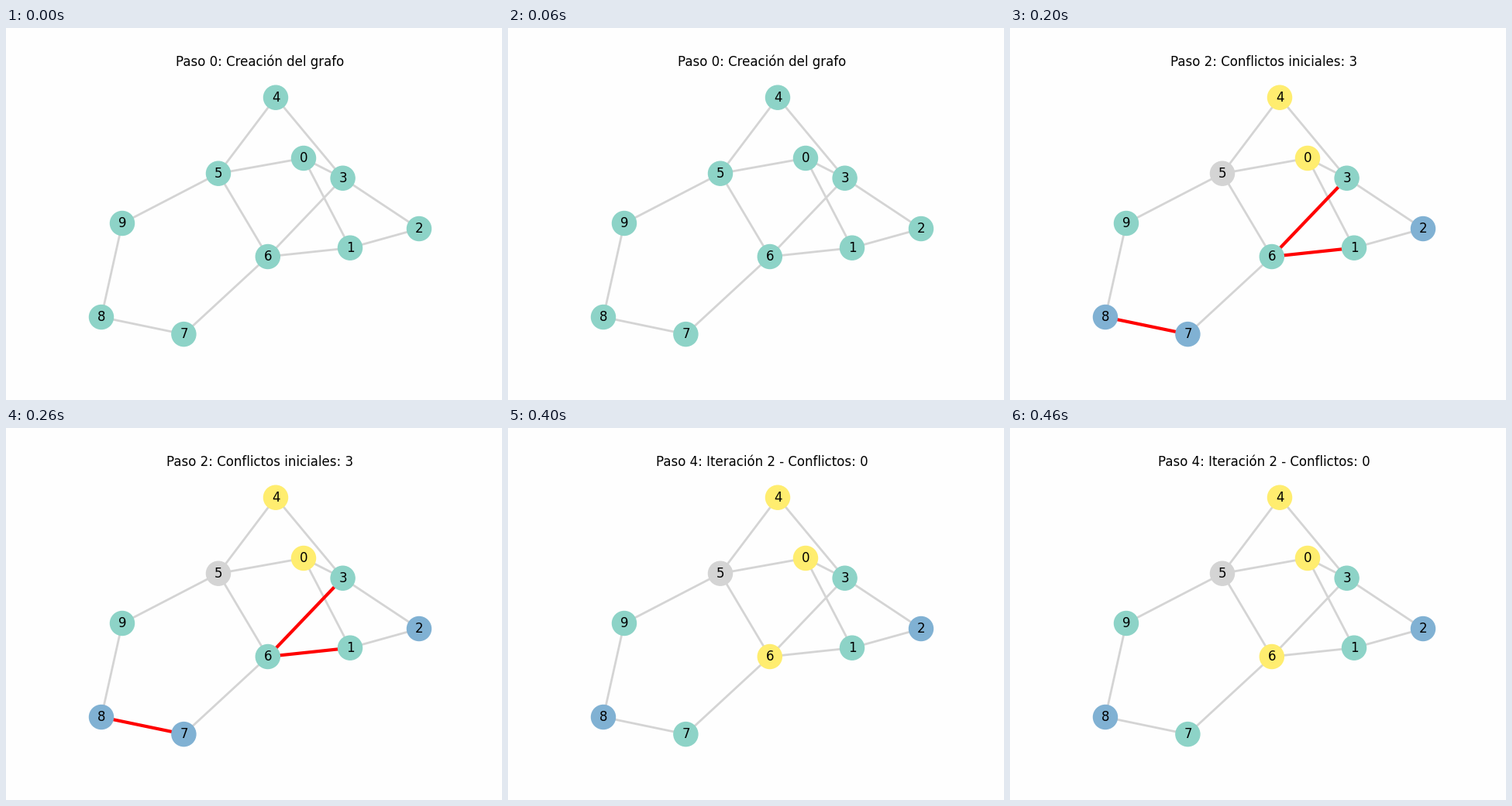
Recreate the animation shown at these times as a matplotlib script. Size 640 by 480 pixels, loop 0.5 s.

```python
import matplotlib.pyplot as plt
from matplotlib.animation import FuncAnimation
from matplotlib.collections import LineCollection

W, H, DPI = 640, 480, 100
GRAY = "#d4d4d4"
PALETTE = ["#8dd3c7", "#80b1d3", GRAY, "#ffed6f"]

# Node centres in pixels
NODES = [(384, 168), (444, 283.7), (533, 259), (434.6, 193.75), (348, 89.7),
         (274, 187.7), (337.8, 295), (229.4, 395.1), (123, 373), (150, 252)]
N = len(NODES)

# A path through all nodes plus a few chords
EDGES = [(i, i + 1) for i in range(N - 1)]
EDGES += [(0, 3), (0, 5), (1, 6), (3, 6), (5, 9)]


def conflicts(colors):
    return [(a, b) for a, b in EDGES if colors[a] == colors[b]]


def improve(colors):
    """Give the most conflicting node the colour with the fewest clashes."""
    def clashes(node, color):
        return sum(node in edge and colors[sum(edge) - node] == color
                   for edge in EDGES)

    worst = max(range(N), key=lambda i: clashes(i, colors[i]))
    best = min(range(len(PALETTE)), key=lambda c: clashes(worst, c))
    return colors[:worst] + [best] + colors[worst + 1:]


def build_steps():
    colors = [int(c) for c in "3010320110"]
    count = len(conflicts(colors))
    steps = [("Creación del grafo", [0] * N, []),
             ("Asignación aleatoria de colores", colors, conflicts(colors)),
             (f"Conflictos iniciales: {count}", colors, conflicts(colors))]
    turn = 0
    while conflicts(colors):
        turn += 1
        colors = improve(colors)
        bad = conflicts(colors)
        steps.append((f"Iteración {turn} - Conflictos: {len(bad)}", colors, bad))
    return steps


STEPS = build_steps()

plt.rcParams["font.family"] = "DejaVu Sans"
fig = plt.figure(figsize=(W / DPI, H / DPI), dpi=DPI, facecolor="#fefefe")
ax = fig.add_axes([0, 0, 1, 1])
ax.set_xlim(0, W)
ax.set_ylim(H, 0)
ax.axis("off")

title = ax.text(328, 49.27, "", fontsize=12, ha="center", va="baseline")
lines = LineCollection([[NODES[a], NODES[b]] for a, b in EDGES], zorder=1)
ax.add_collection(lines)
dots = ax.scatter(*zip(*NODES), s=500, linewidths=1, zorder=2)
for i, (x, y) in enumerate(NODES):
    ax.text(x, y, str(i), fontsize=12, ha="center", va="center", zorder=3)


def draw(step):
    text, colors, bad = STEPS[step]
    title.set_text(f"Paso {step}: {text}")
    lines.set_color(["red" if e in bad else GRAY for e in EDGES])
    lines.set_linewidth([3 if e in bad else 2 for e in EDGES])
    dots.set_color([PALETTE[c] for c in colors])
    return title, lines, dots


anim = FuncAnimation(fig, draw, frames=len(STEPS), interval=100,
                     repeat=True, repeat_delay=0)
plt.show()
```
